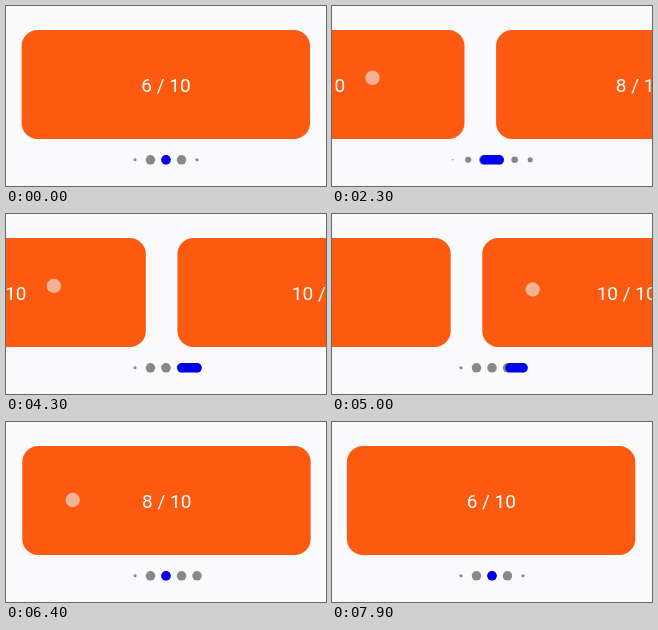
An HTML page that plays this animation: 320x180 px, repeating every 8 s.

```html
<!DOCTYPE html>
<html lang="en">
<head>
<meta charset="utf-8">
<style>
html, body { margin: 0; width: 100%; height: 100%; overflow: hidden; background: #faf9fb; }
svg { display: block; width: 100vw; height: 100vh; }
text { font: 19px Roboto, sans-serif; fill: #fff; text-anchor: middle; }
</style>
</head>
<body>
<svg viewBox="0 0 320 180">
  <g id="track" fill="#fc5a11"></g>
  <g id="dots" fill="#888"></g>
  <rect id="worm" y="149.05" height="9.5" rx="4.75" fill="#0000f0"/>
  <circle id="touch" r="7.2" fill="#f0eeee"/>
</svg>
<script>
const LOOP = 8000, COUNT = 10, PAGE = 320, GAP = 15.5, R = 4.75;
const DRAG = 320, DRAGGED = 0.67, SETTLE = 80;
// start time and direction of each swipe
const swipes = [[1050, 1], [2045, 1], [3040, 1], [4056, 1],
                [4800, -1], [5600, -1], [6400, -1], [7180, -1]];

const $ = id => document.getElementById(id);
const clamp = (v, a = 0, b = 1) => Math.min(b, Math.max(a, v));

function add(parent, tag, attrs) {
  const el = document.createElementNS('http://www.w3.org/2000/svg', tag);
  set(el, attrs);
  return parent.appendChild(el);
}
function set(el, attrs) {
  for (const key in attrs) el.setAttribute(key, attrs[key]);
}

const dots = [];
for (let i = 1; i <= COUNT; i++) {
  const card = add($('track'), 'g', { transform: `translate(${i * PAGE} 0)` });
  add(card, 'rect', { x: 15.6, y: 24, width: 288.4, height: 109, rx: 16 });
  add(card, 'text', { x: 160, y: 85.5 }).textContent = `${i} / ${COUNT}`;
  dots.push(add($('dots'), 'circle', { cy: 153.8 }));
}

// share of a page moved, u ms after the swipe began
function progress(u) {
  if (u <= 0) return 0;
  if (u < DRAG) return DRAGGED * u / DRAG;
  const rest = (1 - DRAGGED) * Math.exp((DRAG - u) / SETTLE);
  return rest < 0.001 ? 1 : 1 - rest;
}

function dotScale(i, page) {
  const d = Math.abs(i - page);
  if (i === COUNT) return clamp(3 - d);
  return d <= 1 ? 1 : d <= 2 ? 1 - 0.67 * (d - 1) : 0.33 * clamp(3 - d);
}

function draw(t) {
  let page = 6, touch = { opacity: 0 };
  for (const [start, dir] of swipes) {
    const u = t - start;
    page += dir * progress(u);
    if (u > -60 && u < DRAG + 180) {
      const moved = progress(Math.min(u, DRAG));
      touch = {
        cx: dir > 0 ? 212 - PAGE * moved : 66 + PAGE * moved,
        cy: (dir > 0 ? 75 : 78) - 6 * moved,
        opacity: 0.6 * clamp((DRAG + 180 - u) / 180)
      };
    }
  }
  set($('track'), { transform: `translate(${-page * PAGE} 0)` });
  set($('touch'), touch);

  const center = Math.min(page, COUNT - 2);
  const dotX = i => 160 + (i - center) * GAP;
  dots.forEach((dot, i) => set(dot, { cx: dotX(i + 1), r: R * dotScale(i + 1, center) }));

  const base = Math.floor(page + 1e-6), part = page - base;
  const left = dotX(base + clamp(2 * part - 1)) - R;
  const right = dotX(base + clamp(2 * part)) + R;
  set($('worm'), { x: left, width: right - left });
}

function frame() {
  draw(performance.now() % LOOP);
  requestAnimationFrame(frame);
}
frame();
</script>
</body>
</html>
```
